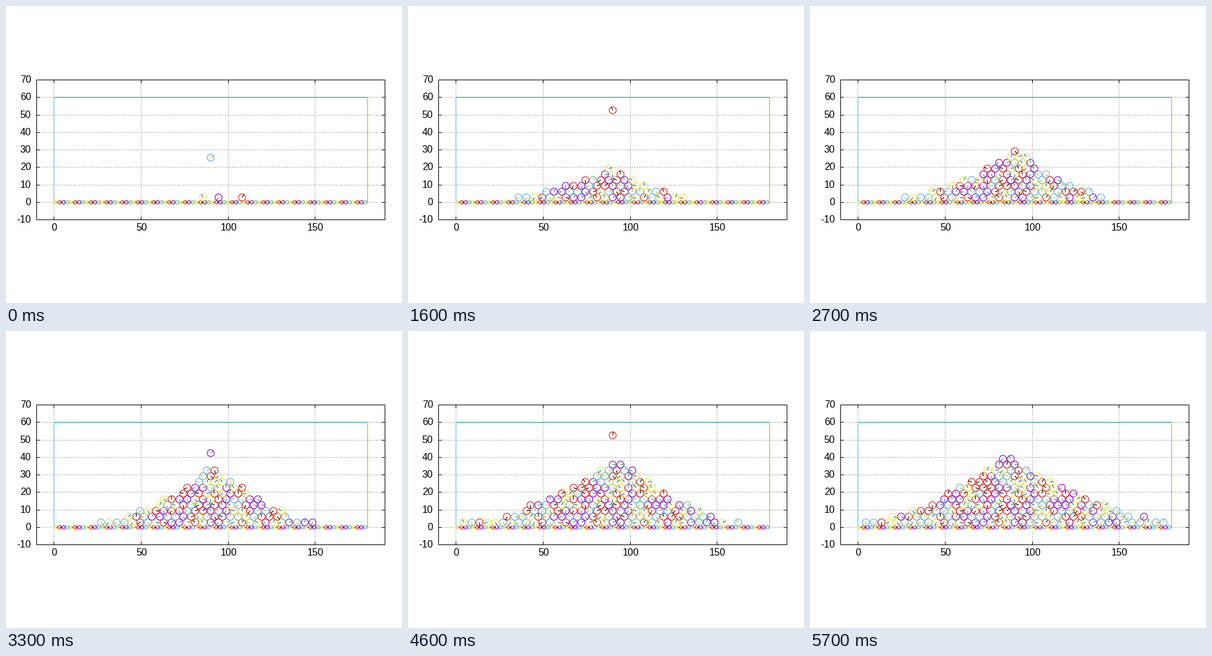
Animation, 640 px wide and 480 px high, one loop 5.8 s. Source, as a matplotlib script:

```python
import math
import random

import matplotlib.pyplot as plt
import numpy as np
from matplotlib.animation import FuncAnimation
from matplotlib.collections import LineCollection

FRAMES, INTERVAL = 58, 100
PX = 0.72  # one pixel in points at 100 dpi
SX, SY = 2.815, 2.825
R, FLOOR_R, PITCH = 2.0, 1.0, 2.25
ROW_0 = math.sqrt((R + FLOOR_R) ** 2 - (PITCH / 2) ** 2)
ROW_H = math.sqrt((2 * R) ** 2 - PITCH ** 2)
RIM = ["#f0e442", "#e51e10", "#9400d3", "#56b4e9"]
HAND = ["#0072b2", "#000000", "#009e73", "#e69f00"]

# Growth of the heap: rows at the peak, peak position and both feet
TIMES = [0, 10, 21, 33, 41, 46, 57]
PEAK = [-.1, 3, 6.8, 9.8, 12.3, 11.2, 11.4]
CENTRE = [95, 91, 90, 91, 90, 93, 84]
LEFT_FOOT = [85, 45, 31, 27, 23, 7, 7]
RIGHT_FOOT = [109, 131, 135, 151, 158, 162, 178]
STEEPNESS, SLACK = 1.6, 0.35


def to_px(x, y):
    return 77.5 + SX * x, 317.25 - SY * y


def heap_height(n, x):
    """Rows of balls at x: a concave cone with a slight ripple."""
    peak, mid, lo, hi = (np.interp(n, TIMES, track) for track in
                         (PEAK, CENTRE, LEFT_FOOT, RIGHT_FOOT))
    u = np.where(x < mid, (mid - x) / (mid - lo), (x - mid) / (hi - mid))
    cone = peak * np.clip(1 - u, 0, 1) ** STEEPNESS
    ripple = -0.25 * np.cos(0.8 * np.pi * np.floor(x / (2 * PITCH)))
    return cone + ripple - 10 * np.clip(u - 1, 0, None)


def simulate():
    """Every frame as a list of (ball index, x, y, angle)."""
    rng = random.Random(7)
    angle = [rng.uniform(0, 2 * math.pi) for _ in range(240)]
    sites = [(2 * PITCH * j + PITCH * (r % 2), r)
             for r in range(14) for j in range(1, 40)]
    site_x, site_r = np.array(sites).T
    placed, waiting, dropped, result = {}, [], 0, []
    for n in range(FRAMES):
        # One ball is released every 5 steps; a frame spans 18 steps
        ball, k = divmod(18 * (n + 1), 5)
        y = 56 - 3.38 * k * k
        top = ROW_0 + ROW_H * np.interp(n, TIMES, PEAK)
        flying = k < 4 and y > top + R
        landed = ball if flying else ball + 1

        room = heap_height(n, site_x) - site_r
        order = np.argsort(-room, kind="stable")[:landed]
        target = [sites[i] for i in order if room[i] >= -SLACK]
        free = [s for s in target if s not in placed]

        # Balls that lost their site slide to the nearest open one
        for old in [s for s in placed if s not in target]:
            b = placed.pop(old)
            if not free:
                waiting.append(b)
                continue
            new = min(free, key=lambda s: math.hypot(
                s[0] - old[0], ROW_H * (s[1] - old[1])))
            free.remove(new)
            placed[new] = b
            angle[b] += rng.uniform(-2, 2)
        waiting += range(dropped, landed)
        dropped = landed
        for s in free:
            if waiting:
                placed[s] = waiting.pop(0)

        balls = [(b, x, ROW_0 + ROW_H * r, angle[b])
                 for (x, r), b in placed.items()]
        if flying:
            balls.append((ball, 90, y, angle[ball]))
        result.append(sorted(balls))
    return result


TURN = np.linspace(0, 2 * np.pi, 41)


def outlines(balls, radius):
    """Rim and hand of each ball as line segments with colours."""
    lines, colors = [], []
    for i, x, y, a in balls:
        lines.append(np.column_stack(to_px(x + radius * np.cos(TURN),
                                           y + radius * np.sin(TURN))))
        tip = to_px(x + radius * math.cos(a), y + radius * math.sin(a))
        lines.append(np.array([to_px(x, y), tip]))
        colors += [RIM[i % 4], HAND[i % 4]]
    return lines, colors


fig = plt.figure(figsize=(6.4, 4.8), dpi=100, facecolor="white")
ax = fig.add_axes([0, 0, 1, 1])
ax.set_xlim(0, 640)
ax.set_ylim(480, 0)
ax.axis("off")


def line(x0, y0, x1, y1, color="black", **kw):
    ax.plot([x0, x1], [y0, y1], color=color, lw=PX, snap=False,
            solid_capstyle="butt", dash_capstyle="butt", **kw)


LEFT, RIGHT, TOP, BOTTOM = 49.5, 612.5, 119.5, 345.5
FONT = dict(family="Liberation Sans", fontsize=16 * PX, color="black")
DOTS = dict(color="#a0a0a0", linestyle=(0, (2, 2)), zorder=1)

for v in range(0, 200, 50):
    x = math.floor(to_px(v, 0)[0]) + 0.5
    line(x, BOTTOM, x, TOP, **DOTS)
    line(x, BOTTOM, x, BOTTOM - 5, zorder=2)
    line(x, TOP, x, TOP + 5, zorder=2)
    ax.text(x + 0.7, 358.5, str(v), ha="center", va="center", **FONT)
for v in range(-10, 80, 10):
    y = math.floor(to_px(0, v)[1]) + 0.5
    if -10 < v < 70:
        line(LEFT, y, RIGHT, y, **DOTS)
    line(LEFT, y, LEFT + 5, y, zorder=2)
    line(RIGHT, y, RIGHT - 5, y, zorder=2)
    ax.text(40.5, y - 0.4, str(v), ha="right", va="center", **FONT)

# Walls and floor
line(77.5, 147.5, 77.5, 317.5, "#56b4e9", zorder=3)
line(77.5, 147.5, 584.5, 147.5, "#009e73", zorder=3)
line(584.5, 147.5, 584.5, 317.5, "#e69f00", zorder=3)
line(77.5, 317.5, 584.5, 317.5, "#f0e442", zorder=3)
floor = [(i, PITCH * (i + 0.5), 0, 0) for i in range(80)]
segs, cols = outlines(floor, FLOOR_R)
STROKE = dict(linewidths=1.15 * PX, snap=False)
ax.add_collection(LineCollection(segs, colors=cols, zorder=4, **STROKE))

heap = LineCollection([], zorder=5, **STROKE)
ax.add_collection(heap)

for ends in ((LEFT, TOP, RIGHT, TOP), (LEFT, BOTTOM, RIGHT, BOTTOM),
             (LEFT, TOP, LEFT, BOTTOM), (RIGHT, TOP, RIGHT, BOTTOM)):
    line(*ends, solid_joinstyle="miter", zorder=6)

states = simulate()


def draw(n):
    lines, colors = outlines(states[n], R)
    heap.set_segments(lines)
    heap.set_color(colors)
    return (heap,)


anim = FuncAnimation(fig, draw, frames=FRAMES, interval=INTERVAL,
                     repeat=True, repeat_delay=0, blit=False)
plt.show()
```
